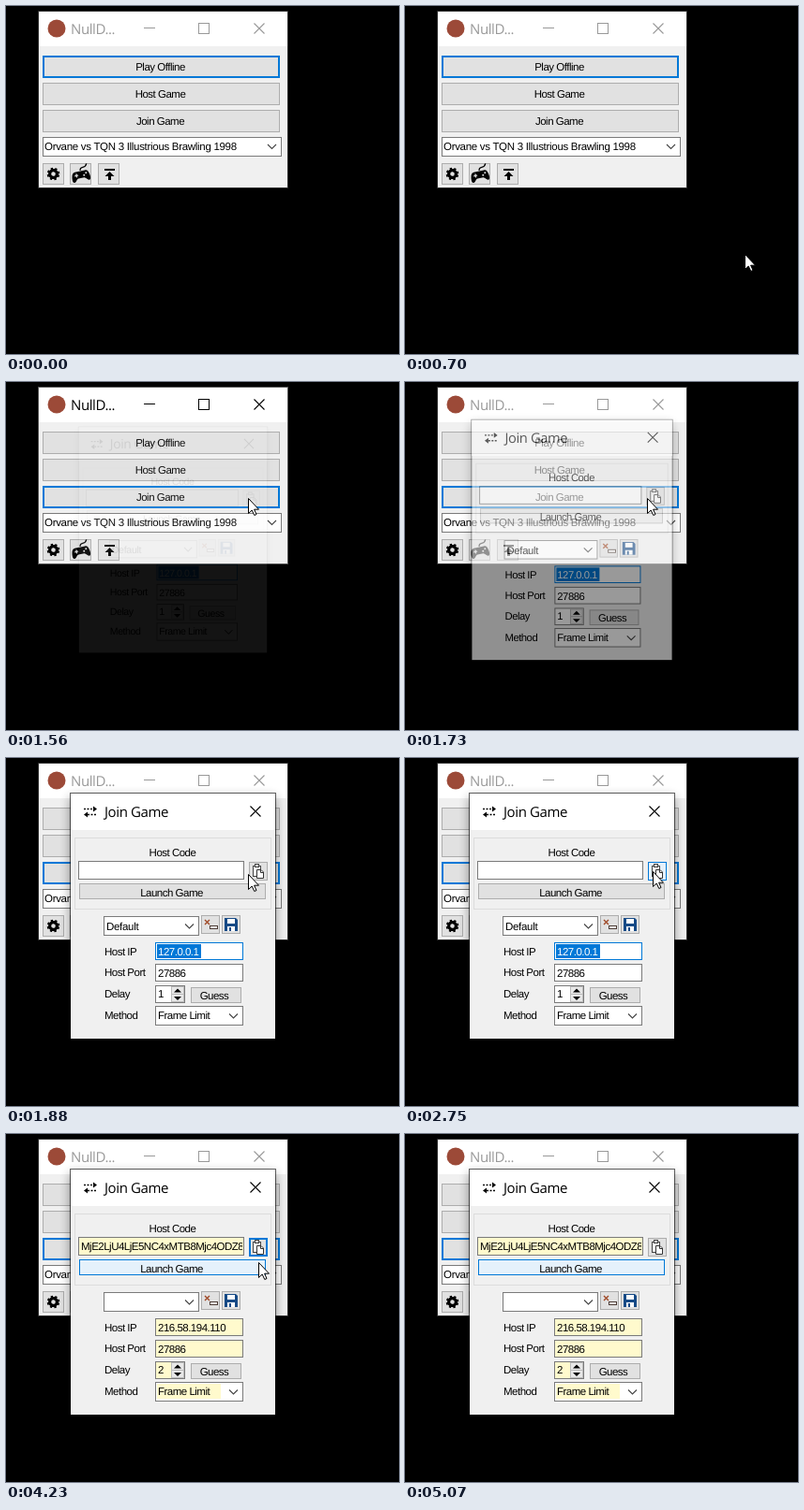
An HTML page that plays this animation: 419 by 372 pixels, repeating every 5.22 s.

```html
<!DOCTYPE html>
<html lang="en">
<head>
<meta charset="utf-8">
<title>Join Game</title>
<style>
  html, body { margin: 0; width: 100%; height: 100%; overflow: hidden; background: #000; }
  svg { display: block; width: 419px; height: 372px; }
  text { font: 11.5px "Liberation Sans", Arial, sans-serif; letter-spacing: -.5px; white-space: pre; text-rendering: geometricPrecision; }
  .title { font: 15px "Open Sans", "Noto Sans", sans-serif; letter-spacing: -.4px; }
  .wide { letter-spacing: -.3px; }
</style>
</head>
<body>
<svg id="stage" viewBox="0 0 419 372"></svg>
<script>
const LOOP = 5220;
const BLUE = '#0078d7', FILLED = '#fffacd';

// time, x, y, shape
const POINTER = [
  [0, 0, 0, ''],
  [550, 386, 297, 'arrow'], [627, 362, 265, 'arrow'], [703, 335, 232, 'arrow'],
  [780, 311, 200, 'arrow'], [857, 291, 174, 'arrow'], [933, 275, 153, 'arrow'],
  [1010, 267, 142, 'arrow'], [1080, 264, 129, 'arrow'], [1165, 260, 126, 'arrow'],
  [1250, 258, 124, 'arrow'], [2260, 260, 124, 'arrow'], [2430, 263, 124, 'arrow'],
  [2580, 262, 124, 'arrow'], [2750, 264, 121, 'arrow'], [2820, 266, 119, 'arrow'],
  [3070, 266, 119, 'busy'], [3220, 266, 118, 'arrow'],
  [3920, 266, 121, 'arrow'], [3998, 267, 126, 'arrow'], [4075, 268, 132, 'arrow'],
  [4153, 269, 136, 'arrow'], [4230, 269, 137, 'arrow'],
  [4690, 269, 137, 'busy'], [4920, 269, 137, 'arrow'], [5070, 0, 0, '']
];
const PLAY = [[0, 'focus'], [1400, 'normal']];
const JOIN = [[0, 'normal'], [1080, 'hot'], [1400, 'down'], [1480, 'focus']];
const LIST = [[0, 0], [933, .5], [1010, 1], [1080, .5], [1165, .2], [1250, 0]];
const ACTIVE = [[0, false], [1400, true], [1640, false]];
// time, opacity, scale
const DIALOG = [[0, 0, 1], [1560, .08, .92], [1640, .3, .955], [1730, .6, .979], [1800, .87, .994], [1880, 1, 1]];
const CARET = [[0, false], [2260, true], [2750, false]];
const PASTE = [[0, 'normal'], [2260, 'hot'], [2990, 'down'], [3220, 'hot'], [3998, 'focus'], [4690, 'normal']];
const LAUNCH = [[0, 'normal'], [4153, 'warm'], [4230, 'hot'], [4690, 'down'], [4920, 'hot']];
const PASTED = [[0, false], [3150, true]];

const STYLES = {
  normal: ['#e1e1e1', '#adadad', 1],
  focus: ['#e1e1e1', BLUE, 2],
  warm: ['#e3e9ee', '#5794c2', 1],
  hot: ['#e5f1fb', BLUE, 1],
  down: ['#cce4f7', '#005499', 1]
};

const row = (table, t) => table.filter(r => r[0] <= t).pop();
const state = (table, t) => row(table, t)[1];

const fillRect = (x, y, r, b, fill, more = '') =>
  `<rect x="${x}" y="${y}" width="${r - x}" height="${b - y}" fill="${fill}" ${more}/>`;
const box = (x, y, r, b, fill, stroke, w = 1) =>
  `<rect x="${x + w / 2}" y="${y + w / 2}" width="${r - x - w}" height="${b - y - w}" fill="${fill}" stroke="${stroke}" stroke-width="${w}"/>`;
const line = (d, stroke = '#000', w = 1, more = '') =>
  `<path d="${d}" fill="none" stroke="${stroke}" stroke-width="${w}" ${more}/>`;
const shape = (d, fill = '#000') => `<path d="${d}" fill="${fill}"/>`;
const text = (x, y, s, fill = '#000', more = '') => `<text x="${x}" y="${y}" fill="${fill}" ${more}>${s}</text>`;
const middle = (x, y, s) => text(x, y, s, '#000', 'text-anchor="middle"');
const button = (x, y, r, b, kind = 'normal') => box(x, y, r, b, ...STYLES[kind]);
const field = (x, y, r, b, fill = '#fff', stroke = '#7a7a7a') => box(x, y, r, b, fill, stroke);
const chevron = (x, y) => line(`M${x - 4.5} ${y - 2}l4.5 4.5 4.5-4.5`, '#444', 1.1);
const cross = (x, y, n, color) => line(`M${x} ${y}l${n} ${n}m0-${n}l-${n} ${n}`, color, 1.1);

function gear(x, y) {
  const teeth = 2 * Math.PI * 5.6 / 16;
  return `<g transform="translate(${x} ${y}) rotate(11)" fill="none" stroke="#000">
    <circle r="3.9" stroke-width="3.2"/>
    <circle r="5.6" stroke-width="2.4" stroke-dasharray="${teeth}"/></g>`;
}

function gamepad() {
  return '<g transform="rotate(-12 79.5 180)">' +
    line('M80 176c0-3 2-3 4-3s3-1 4-3', '#000', 1.3) +
    shape('M74 176.5h11c2.5 0 3.5 2 4 5s.5 6-1.5 6-3-3.5-5-3.5h-6c-2 0-3 3.5-5 3.5s-2-3-1.5-6 1.5-5 4-5z') +
    line('M73 180.5h4m-2-2v4', '#e1e1e1', 1.2) +
    '<circle cx="83" cy="181.5" r="1" fill="#e1e1e1"/><circle cx="85.5" cy="179.5" r="1" fill="#e1e1e1"/></g>';
}

function mainWindow(t) {
  const active = state(ACTIVE, t), ink = active ? '#000' : '#999';
  const hover = state(LIST, t);
  return box(34, 5, 301, 195, '#f0f0f0', active ? '#555' : '#2b2b2b') +
    fillRect(35, 6, 300, 43, '#fff') +
    '<circle cx="54" cy="24" r="9.5" fill="#9c4a38"/>' +
    text(69, 30, 'NullD...', ink, 'class="title"') +
    line('M147 23.5h12', ink) + box(205, 18, 217, 30, 'none', ink) + cross(264.5, 18.5, 11, ink) +
    button(39, 53, 292, 77, state(PLAY, t)) + middle(164.5, 69, 'Play Offline') +
    button(39, 82, 292, 106) + middle(164.5, 98, 'Host Game') +
    button(39, 111, 292, 135, state(JOIN, t)) + middle(164.5, 127, 'Join Game') +
    field(39, 140, 294, 161) +
    (hover ? `<g opacity="${hover}">${box(39, 140, 294, 161, 'none', '#333')}${box(273, 140, 294, 161, '#e5f1fb', BLUE)}</g>` : '') +
    text(41, 154, 'Orvane vs TQN 3 Illustrious Brawling 1998', '#000', 'class="wide"') +
    chevron(283.5, 150) +
    button(39, 168, 62, 191) + gear(50.5, 179.5) +
    button(68, 168, 91, 191) + gamepad() +
    button(98, 168, 121, 191) + fillRect(105, 174, 116, 176, '#000') +
    shape('M110.5 177l5 5h-3.5v4h-3v-4h-3.5z');
}

function smallIcons() {
  return line('M212 173l5 5m0-5l-5 5', '#a04a28', 1.4) + box(217, 179, 226, 183, '#fff', '#4a3a34') +
    shape('M233 171h12l2 2v12h-14z', '#174a86') +
    fillRect(236, 172, 244, 177, '#fff') + fillRect(236, 180, 244, 185, '#fff') +
    fillRect(238, 181, 240, 185, '#174a86');
}

function clipboard() {
  return box(263, 115, 272, 127, '#f4f4f4', '#444') + box(265, 113, 270, 117, '#ddd', '#444') +
    shape('M267 119h5l3 3v7h-8z', '#fff') + line('M267.5 119.5h4.5l2.5 2.5v6.5h-7zM271.5 119.5v3h3', '#333');
}

function spinner() {
  return box(176, 244, 190, 253, '#e8e8e8', '#bbb') + box(176, 252, 190, 261, '#e8e8e8', '#bbb') +
    shape('M179 250.5l4-4 4 4zM179 255l4 4 4-4z');
}

function dialog(t) {
  const [, opacity, scale] = row(DIALOG, t);
  if (!opacity) return '';
  const done = state(PASTED, t), back = done ? FILLED : '#fff';
  const address = done
    ? text(162, 211, '216.58.194.110')
    : fillRect(161, 199, 208, 214, BLUE) + text(162, 211, '127.0.0.1', '#fff') +
      (state(CARET, t) ? fillRect(207, 199, 208, 213, '#ff8728') : '');
  return `<g opacity="${opacity}" transform="translate(178 169) scale(${scale}) translate(-178 -169)">` +
    fillRect(69, 42, 287, 304, '#000', 'opacity=".45" filter="url(#soft)"') +
    fillRect(69, 38, 287, 300, '#f0f0f0') +
    box(68, 37, 288, 301, 'none', 'rgba(0,0,0,.6)') +
    fillRect(69, 38, 287, 77, '#fff') +
    line('M83 54.5h10M87 60.5h10', '#000', 1.4, 'stroke-dasharray="2 1.5"') +
    shape('M93 51.5l4 3-4 3zM87 57.5l-4 3 4 3z') +
    text(105, 63, 'Join Game', '#000', 'class="title"') + cross(260.5, 51.5, 11, '#000') +
    box(73, 85, 283, 162, 'none', '#dcdcdc') + middle(177.5, 105, 'Host Code') +
    field(77, 110, 254, 130, back) +
    (done ? `<g clip-path="url(#codeClip)">${text(80, 124, 'MjE2LjU4LjE5NC4xMTB8Mjc4ODZ8')}</g>` : '') +
    button(259, 111, 279, 131, state(PASTE, t)) + clipboard() +
    button(78, 134, 277, 151, state(LAUNCH, t)) + middle(176.5, 148, 'Launch Game') +
    field(104, 169, 206, 190) + (done ? '' : text(107, 184, 'Default', '#000', 'class="wide"')) + chevron(195.5, 179.5) +
    button(208, 168, 228, 188) + button(230, 168, 250, 188) + smallIcons() +
    ['Host IP', 'Host Port', 'Delay', 'Method'].map((s, i) => text(105, [211, 233, 256, 279][i], s)).join('') +
    field(159, 197, 253, 216, back, done ? '#7a7a7a' : BLUE) + address +
    field(159, 220, 253, 239, back) + text(162, 234, '27886') +
    field(159, 243, 191, 262, back) + text(162, 256, done ? '2' : '1') + spinner() +
    button(197, 245, 251, 262) + middle(222, 258, 'Guess') +
    field(159, 265, 253, 286) + fillRect(161, 267, 229, 283, back) +
    text(162, 279, 'Frame Limit') + chevron(242.5, 275.5) + '</g>';
}

function pointer(t) {
  const [, x, y, kind] = row(POINTER, t);
  if (!kind) return '';
  const art = kind === 'arrow'
    ? '<path d="M.5 .5V16.5L4.2 13 6.8 18.5 9 17.5 6.6 12.2H11.5Z" fill="#fff" stroke="#000"/>'
    : '<circle r="12" fill="none" stroke="#1b86d8" stroke-width="5.5"/>' +
      line('M0-12A12 12 0 0 1 12 0', '#8fd3fa', 5.5);
  return `<g transform="translate(${x} ${y})">${art}</g>`;
}

const stage = document.getElementById('stage');
const defs = '<defs><clipPath id="codeClip"><rect x="78" y="111" width="174" height="18"/></clipPath>' +
  '<filter id="soft" x="-20%" y="-20%" width="140%" height="140%"><feGaussianBlur stdDeviation="6"/></filter></defs>';
const start = performance.now();
let shown = '';

function draw() {
  const t = (performance.now() - start) % LOOP;
  const next = defs + mainWindow(t) + dialog(t) + pointer(t);
  if (next !== shown) stage.innerHTML = shown = next;
  requestAnimationFrame(draw);
}
draw();
</script>
</body>
</html>
```
